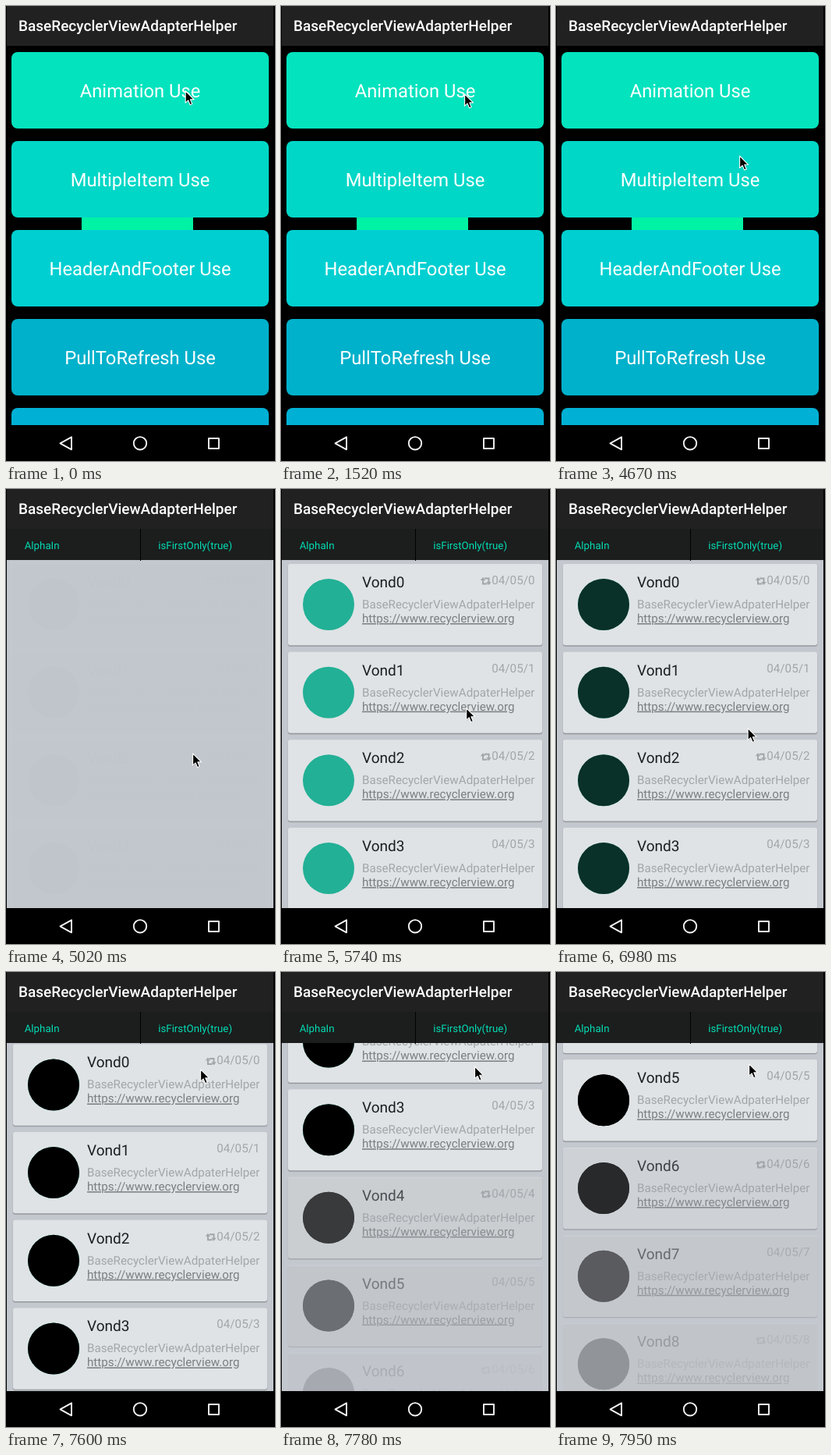
Write an HTML page that moves like this. It is 345x583 px and loops after 8000 ms.

```html
<!DOCTYPE html>
<html lang="en">
<head>
<meta charset="utf-8">
<title>List animation demo</title>
<style>
  html, body { margin: 0; width: 100%; height: 100%; overflow: hidden; background: #000; }
  svg { display: block; width: 100%; height: 100%; font-family: Roboto, "Noto Sans", sans-serif; }
  text { text-rendering: geometricPrecision; }
  .title { font-size: 19px; font-weight: 500; fill: #fff; }
  .menu { font-size: 23.75px; fill: #fff; text-anchor: middle; }
  .tab { font-size: 13.3px; fill: #04dbb4; }
  .name { font-size: 19px; fill: #1b1e1f; }
  .note { font-size: 15.2px; fill: #a3a6a8; }
  .link { font-size: 15.2px; fill: #7b7f81; text-decoration: underline; }
  .end { text-anchor: end; }
</style>
</head>
<body>
<svg viewBox="0 0 345 583" preserveAspectRatio="none">
  <rect width="345" height="583" fill="#000"/>
  <g id="menu">
    <rect x="97" y="200" width="143" height="143" fill="#00f2a5"/>
  </g>
  <g id="page">
    <rect x="1" y="51" width="342" height="487" fill="#c3c7ce"/>
    <g id="list"></g>
    <rect x="1" y="51" width="342" height="40" fill="#1b1e1d"/>
    <rect x="172" y="51" width="1" height="41" fill="#000"/>
    <text class="tab" x="23.7" y="77">AlphaIn</text>
    <text class="tab" x="195.2" y="77">isFirstOnly(true)</text>
  </g>
  <rect x="1" width="342" height="51" fill="#212121"/>
  <text class="title" x="16" y="32">BaseRecyclerViewAdapterHelper</text>
  <rect y="537" width="345" height="46" fill="#000"/>
  <g fill="none" stroke="#f4f4f4" stroke-width="1.9" stroke-linejoin="round">
    <path d="M69.5 560.3L84 552.3V568.3Z"/>
    <circle cx="172" cy="560.3" r="8.2"/>
    <rect x="260" y="554" width="13" height="13"/>
  </g>
  <g id="cursor">
    <path d="M.8 2V17.5L4.3 14.2L6.8 19.5L9.6 18.3L7.2 13L12 12.8Z" fill="#000" opacity=".22"/>
    <path d="M.6 .8V16.2L4.1 12.9L6.6 18.7L9.2 17.6L6.8 11.9H11.6Z" fill="#000" stroke="#fff" stroke-width="1.1" stroke-linejoin="round"/>
  </g>
</svg>
<script>
const LOOP = 8000;
const PITCH = 112.67, TOP = 96, BOTTOM = 537;
const OPEN = 5020, FLING = 7600, FLING_MS = 350, FLING_PX = 545, FADE = 270;
const COUNT = 9, FIRST_SCREEN = 4;

const $ = id => document.getElementById(id);
const all = selector => [...document.querySelectorAll(selector)];
const progress = (t, from, length) => Math.max(0, Math.min(1, (t - from) / length));
const mix = (a, b, p) => a + (b - a) * p;

// Each cursor stroke: begins, ends, target x, target y
const strokes = [
  [0, 180, 152, 101], [180, 360, 300, 119], [450, 710, 222, 113],
  [1160, 1340, 95, 100], [1340, 1520, 235, 112],
  [4660, 4670, 235, 191], [4670, 5020, 239, 338],
  [5380, 5560, 286, 314], [5650, 5920, 141, 213], [6000, 6270, 205, 210],
  [6360, 6720, 246, 293], [6720, 7250, 245, 319],
  [7250, 7600, 249, 124], [7600, 7950, 247, 117]
];

function cursorAt(t) {
  let x = 230, y = 108;
  for (const [from, to, toX, toY] of strokes) {
    const p = progress(t, from, to - from);
    x = mix(x, toX, p);
    y = mix(y, toY, p);
  }
  return [x, y];
}

const scrollAt = t => 2 * progress(t, 7430, FLING - 7430) + FLING_PX * progress(t, FLING, FLING_MS);

// A card starts to fade in when its top edge scrolls into view.
const shownAt = i => i < FIRST_SCREEN
  ? OPEN
  : FLING + FLING_MS * (TOP + i * PITCH - BOTTOM - 2) / FLING_PX;

const menuItems = [
  ["Animation Use", "#02e3be"], ["MultipleItem Use", "#00d7c7"],
  ["HeaderAndFooter Use", "#00cfd1"], ["PullToRefresh Use", "#00b1cb"], ["", "#00b1d5"]
];
$("menu").innerHTML += menuItems.map(([label, color], i) => `
  <g transform="translate(0 ${i * 114})">
    <rect x="7" y="59" width="330" height="98" rx="8" fill="${color}"/>
    <text class="menu" x="172" y="117">${label}</text>
  </g>`).join("");

const repeatIcon = `
  <path d="M259 115V121.5H264.5M266.5 121V114.5H261" fill="none" stroke="#a3a6a8" stroke-width="2"/>
  <path d="M255.8 117L259 113L262.2 117ZM263.3 119L266.5 123L269.7 119Z" fill="#a3a6a8"/>`;

const card = i => `
  <g transform="translate(0 ${i * PITCH})">
    <g class="shade">
      <rect x="8.5" y="97" width="327" height="105" rx="3.5" fill="#000" opacity=".1"/>
      <rect x="9" y="97" width="326" height="104.4" rx="3" fill="#94989e"/>
    </g>
    <g class="body">
      <rect x="9" y="96" width="326" height="104.2" rx="3" fill="#dfe3e5"/>
      <circle cx="61" cy="148" r="33" fill="${i < FIRST_SCREEN ? "#22b096" : "#000"}"/>
      <circle class="photo" cx="61" cy="148" r="33" fill="#000"/>
      <text class="name" x="104" y="126">Vond${i}</text>
      ${i % 2 ? "" : repeatIcon}
      <text class="note end" x="325.5" y="122">04/05/${i}</text>
      <text class="note" x="104" y="153">BaseRecyclerViewAdpaterHelper</text>
      <text class="link" x="104" y="171">https://www.recyclerview.org</text>
    </g>
  </g>`;
$("list").innerHTML = Array.from({ length: COUNT }, (_, i) => card(i)).join("");

const shades = all(".shade"), bodies = all(".body"), photos = all(".photo");

function draw(t) {
  const [x, y] = cursorAt(t);
  $("cursor").setAttribute("transform", `translate(${x} ${y})`);
  $("page").setAttribute("opacity", progress(t, 4760, 170));
  $("list").setAttribute("transform", `translate(0 ${-scrollAt(t)})`);
  for (let i = 0; i < COUNT; i++) {
    // Faded separately, so the shadow shows through a half-clear card.
    const alpha = progress(t, shownAt(i), FADE);
    shades[i].setAttribute("opacity", alpha);
    bodies[i].setAttribute("opacity", alpha);
    photos[i].setAttribute("opacity", progress(t, 6720, 360));
  }
}

const start = performance.now();
function tick() {
  draw((performance.now() - start) % LOOP);
  requestAnimationFrame(tick);
}
tick();
</script>
</body>
</html>
```
